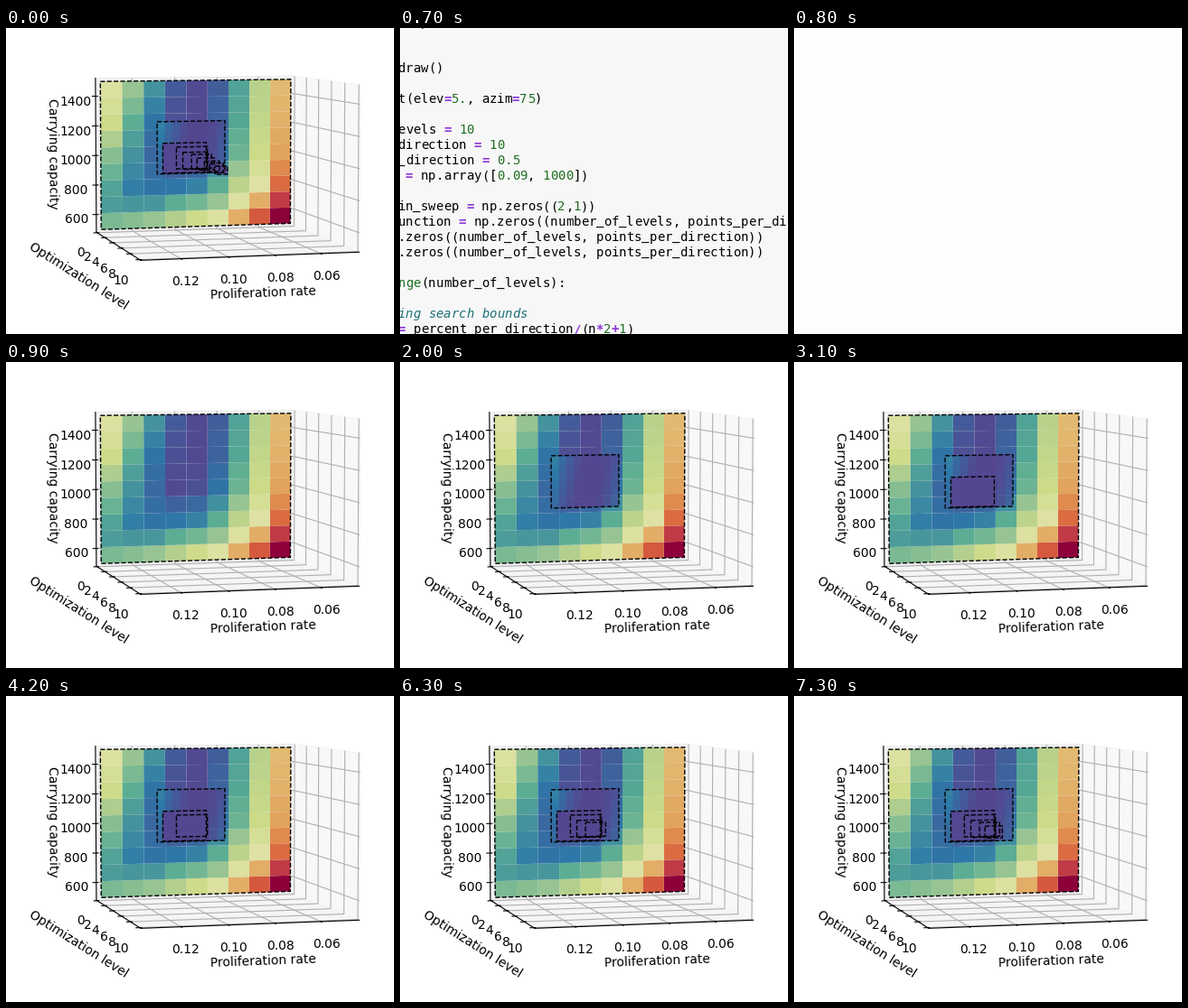
Write a matplotlib script that moves like this. It is 429x339 px and loops after 8 s.

```python
import numpy as np
import matplotlib.pyplot as plt
from matplotlib.animation import FuncAnimation
from matplotlib.patches import Rectangle

W, H, DPI = 429, 339, 100
STEP, LOOP = 100, 8000
SHADE = 0.89
CELLS = 9
LEVELS = 10

plt.rcParams["font.family"] = "DejaVu Sans"
fig = plt.figure(figsize=(W / DPI, H / DPI), dpi=DPI, facecolor="white")

# ---- 3D plot
SIDE = 369.6
ax = fig.add_axes([49.4 / W, 0.9 / H, SIDE / W, SIDE / H],
                  projection="3d", computed_zorder=False)
ax.patch.set_visible(False)
ax.view_init(elev=5, azim=75)
ax.set_xlabel("Proliferation rate")
ax.set_ylabel("Optimization level")
ax.set_zlabel("Carrying capacity")


def padded(lo, hi):
    pad = (hi - lo) / 48
    return lo - pad, hi + pad


# error in percent along the rate axis, for a few rows of the coarse sweep
ROWS = [0, 2, 4, 6, 7, 8]
ERRORS = np.array([
    [47, 30, 15, 4, 1, 5, 18, 36, 63],
    [41, 20, 9, 2, 1, 6, 19, 38, 65],
    [27, 15, 7, 1, 2, 9, 23, 40, 68],
    [18, 11, 9, 10, 12, 20, 37, 48, 78],
    [17, 16, 16, 20, 24, 30, 47, 66, 89],
    [25, 27, 30, 35, 41, 47, 66, 82, 100],
])


def error(n):
    if n == 0:
        return np.array([np.interp(range(CELLS), ROWS, col) for col in ERRORS.T]).T / 100
    if n > 1:
        return np.zeros((1, 1))
    v, u = np.mgrid[0:CELLS, 0:CELLS] / (CELLS - 1)
    off = u - 0.6 + 0.15 * (v - 0.5)
    return np.clip(0.27 * off ** 2 - 0.005, 0, 1)


def surface(n, rate, capacity):
    values = error(n)
    count = len(values) + 1
    x, z = np.meshgrid(np.linspace(*rate[::-1], count), np.linspace(*capacity[::-1], count))
    colors = plt.get_cmap("Spectral_r")(values)
    colors[..., :3] *= SHADE
    # the last row and column of colours are never used
    colors = np.pad(colors, ((0, 1), (0, 1), (0, 0)), mode="edge")
    fill = ax.plot_surface(x, np.full_like(x, n), z, facecolors=colors, shade=False,
                           linewidth=0, edgecolor="none", zorder=4 + n / 20)
    (r0, r1), (c0, c1) = rate, capacity
    edge, = ax.plot([r1, r0, r0, r1, r1], [n] * 5, [c1, c1, c0, c0, c1],
                    "k--", linewidth=1, zorder=5 + n / 20)
    return fill, edge


def search():
    """Shrink the sweep around the grid point nearest to the best fit."""
    best = np.array([0.09981, 1000.3])
    center = np.array([0.09, 1000.0])
    found = []
    for n in range(LEVELS):
        reach = 0.5 / (2 * n + 1)
        lo, hi = center * (1 - reach), center * (1 + reach)
        found.append(surface(n, (lo[0], hi[0]), (lo[1], hi[1])))
        step = (hi - lo) / CELLS
        center = lo + step * np.round((best - lo) / step)
    return found


levels = search()
ax.set_xlim(padded(0.045, 0.135))
ax.set_ylim(padded(0, 10))
ax.set_zlim(padded(500, 1500))
ax.set_xticks([0.06, 0.08, 0.10, 0.12])
ax.set_yticks(range(0, 11, 2))
ax.set_zticks(range(600, 1401, 200))

# ---- notebook page
top = fig.add_axes([0, 0, 1, 1], zorder=5)
top.set_xlim(0, W)
top.set_ylim(H, 0)
top.axis("off")

CODE_SIZE = 14
CODE_X, CODE_Y, CODE_DY = -2.6, 49, 17
CODE_W = 0.602 * CODE_SIZE
STYLES = {
    "k": dict(color="black"),
    "n": dict(color="#1f6e22"),
    "o": dict(color="#8a35d6", weight="bold"),
    "c": dict(color="#1f7276", style="italic"),
}
# row number, then style and text in turn
CODE = [
    (-3, "k", "   p  ,"),
    (0, "k", "draw()"),
    (2, "k", "t(elev", "o", "=", "n", "5.", "k", ", azim", "o", "=", "n", "75", "k", ")"),
    (4, "k", "evels ", "o", "=", "n", " 10"),
    (5, "k", "direction ", "o", "=", "n", " 10"),
    (6, "k", "_direction ", "o", "=", "n", " 0.5"),
    (7, "o", " =", "k", " np.array([", "n", "0.09", "k", ", ", "n", "1000", "k", "])"),
    (9, "k", "in_sweep ", "o", "=", "k", " np.zeros((", "n", "2", "k", ",", "n", "1", "k", "))"),
    (10, "k", "unction ", "o", "=", "k", " np.zeros((number_of_levels, points_per_di"),
    (11, "k", ".zeros((number_of_levels, points_per_direction))"),
    (12, "k", ".zeros((number_of_levels, points_per_direction))"),
    (14, "n", "nge", "k", "(number_of_levels):"),
    (16, "c", "ing search bounds"),
    (17, "o", "=", "k", " percent_per_direction", "o", "/", "k", "(n", "o", "*", "n", "2",
     "o", "+", "n", "1", "k", ")"),
]


def code_line(row, parts):
    chars = [(c, kind) for kind, text in zip(parts[::2], parts[1::2]) for c in text]
    return [top.text(CODE_X + col * CODE_W, CODE_Y + row * CODE_DY, c,
                     family="DejaVu Sans Mono", fontsize=CODE_SIZE * 72 / DPI,
                     va="baseline", zorder=9, **STYLES[kind])
            for col, (c, kind) in enumerate(chars) if c != " "]


def cover(color, z):
    return top.add_patch(Rectangle((0, 0), W, H, color=color, zorder=z))


page = [cover("#f7f7f7", 8)]
for row, *parts in CODE:
    page += code_line(row, parts)
blank = cover("#fefefe", 10)

# ---- timeline
PAGE_AT, BLANK_AT = 700, 800
LEVEL_AT = [900, 2000, 3100, 4200, 5200, 6300, 7300]


def draw(i):
    t = i * STEP
    shown = LEVELS if t < PAGE_AT else sum(t >= s for s in LEVEL_AT)
    ax.set_visible(shown > 0)
    for n, parts in enumerate(levels):
        for part in parts:
            part.set_visible(n < shown)
    for item in page:
        item.set_visible(PAGE_AT <= t < BLANK_AT)
    blank.set_visible(BLANK_AT <= t < LEVEL_AT[0])
    return []


anim = FuncAnimation(fig, draw, frames=LOOP // STEP, interval=STEP,
                     repeat=True, repeat_delay=0, blit=False)
plt.show()
```
